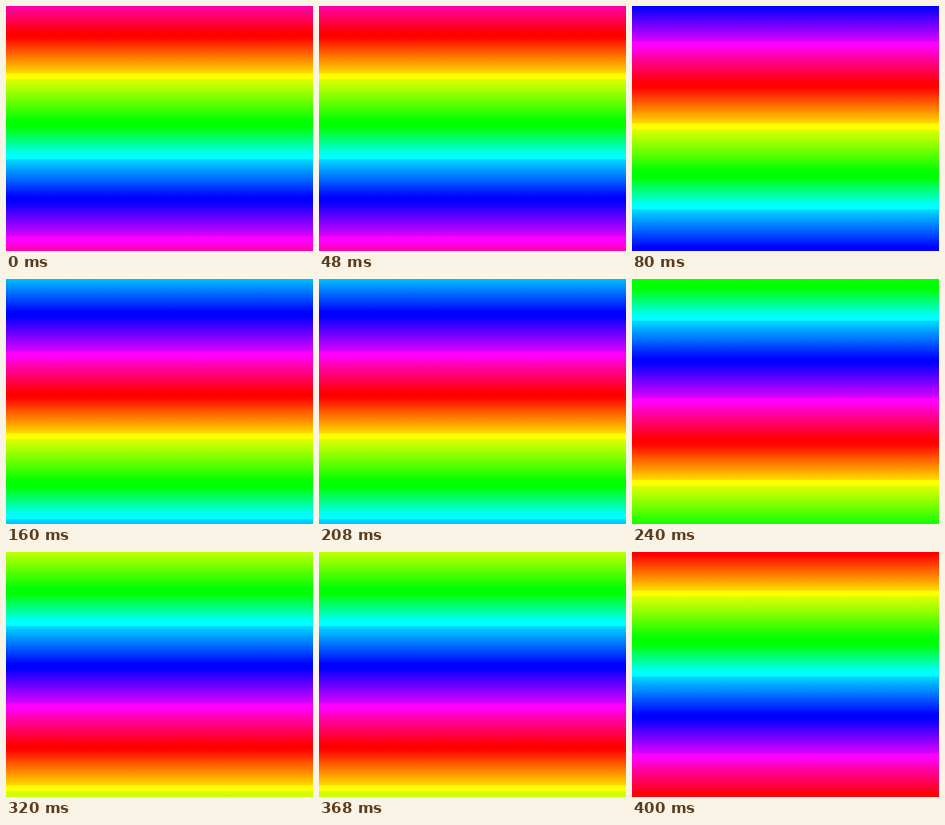
An HTML page without scripts for the animation above (0.48 s loop, 500 by 400 pixels).

```html
<!DOCTYPE html>
<html lang="en">
<head>
<meta charset="utf-8">
<title>Rolling rainbow</title>
<style>
  html, body {
    margin: 0;
    width: 100%;
    height: 100%;
    overflow: hidden;
  }

  /* One full hue cycle is as tall as the stage, so it wraps without a seam. */
  .rainbow {
    width: 500px;
    height: 400px;
    background: 0 0 / 100% 400px repeat linear-gradient(
      #ff00ac 0,
      #f00 44px 51px,
      #ffdc00 110px, #ff0 110px 119px, #d8ff00 120px,
      #c3ff00 129px,
      #0f0 188px 197px,
      #0ff 243px 250px, #00dcff 250px,
      #00f 312px 319px,
      #dc00ff 376px, #f0f 376px 383px,
      #ff00ac 400px
    );
    animation: roll 480ms step-end infinite;
  }

  /* Uneven jumps, each pose held for 80 ms. */
  @keyframes roll {
    0%      { background-position-y: 0; }
    16.667% { background-position-y: 82px; }
    33.333% { background-position-y: 142px; }
    50%     { background-position-y: 218px; }
    66.667% { background-position-y: 271px; }
    83.333% { background-position-y: 353px; }
    100%    { background-position-y: 400px; }
  }
</style>
</head>
<body>
  <div class="rainbow"></div>
</body>
</html>
```
